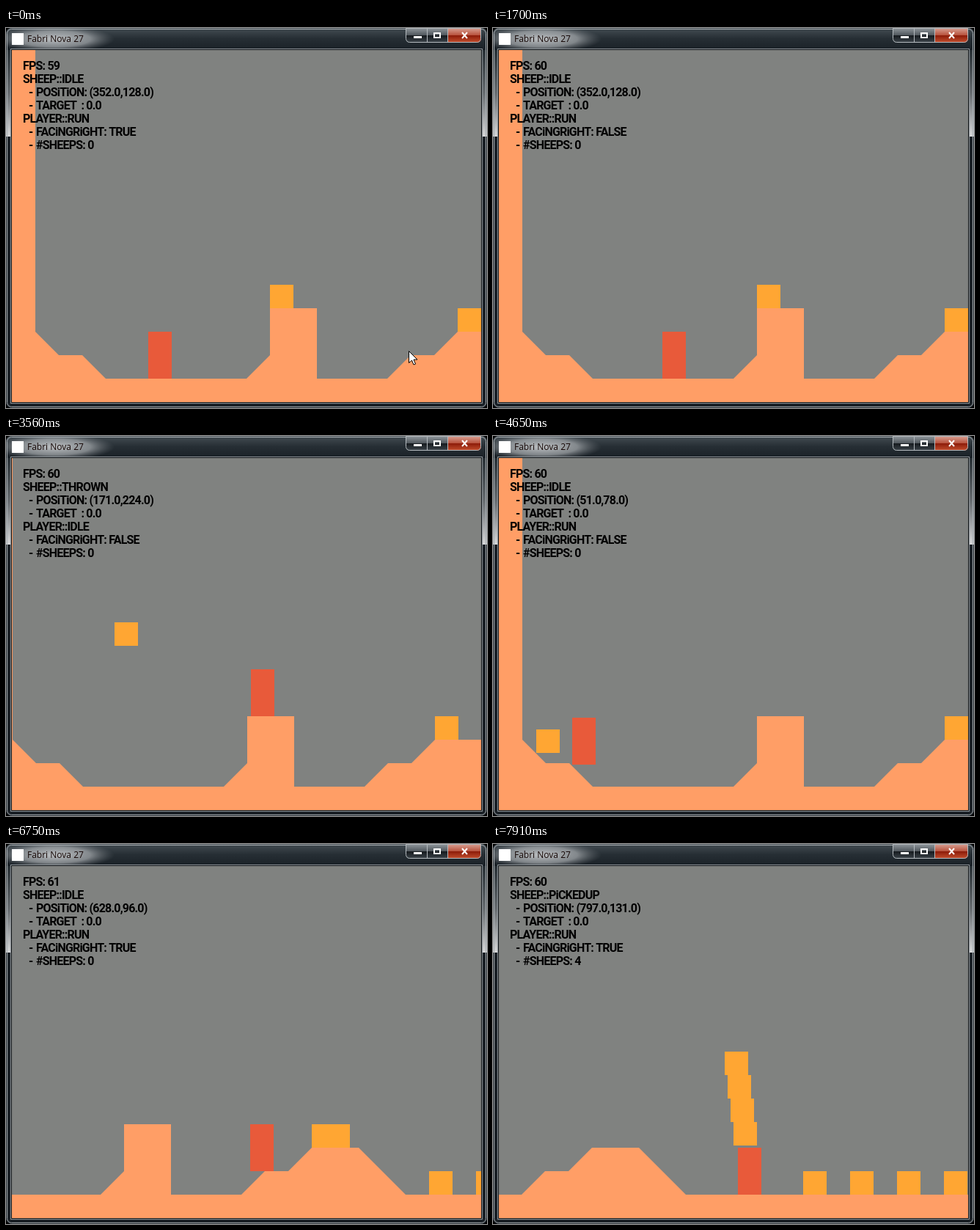
Animation, 656 px wide and 518 px high, one loop 7.99 s. Source, as an HTML page with a canvas:

```html
<!DOCTYPE html>
<html lang="en">
<head>
<meta charset="utf-8">
<title>Sheep platformer</title>
<style>
html, body { margin: 0; width: 100%; height: 100%; overflow: hidden; background: #000; }
canvas { display: block; width: 656px; height: 518px; }
</style>
</head>
<body>
<canvas id="stage" width="656" height="518"></canvas>
<script>
const ctx = document.getElementById('stage').getContext('2d');
const LOOP = 7990, TICKS = 103, TICK = LOOP / TICKS;
const LEFT = 8, TOP = 30, W = 640, H = 480, FLOOR = TOP + H, TILE = 32;
const SKY = '#808280', EARTH = '#ff9e66', WOOL = '#ffa633', HERO = '#e85a3a';

// Level, top row first; s marks a sheep
const LEVEL = [
  ...Array(10).fill('#'),
  '#          s',
  '#          ##      s',
  '#\\         ##     /##\\',
  '###\\      /##   /#####\\ ' + 's '.repeat(10),
  '#'.repeat(60)
];

// Physics, in pixels per tick
const SUB = 200, DT = 1 / SUB;
const RUN = 18.84, JUMP = 50.7, GRAVITY = 12.9, THROW_X = 38.34, THROW_Y = 38;

// Key presses, in ticks
const KEYS = {
  right: [0, 13.4, 22.4, 61.82],
  left: [8.75, 19, 36.2, 46.37],
  stop: [4, 33.1, 38],
  jump: [11.8, 26.2, 73],
  grab: [32.5, 62.5, 90, 92, 99, 102],
  toss: [41, 76.855]
};

function eachTile(visit) {
  LEVEL.forEach((row, i) => [...row].forEach((tile, col) => {
    if (tile !== ' ') visit(tile, col * TILE, (LEVEL.length - 1 - i) * TILE);
  }));
}

function heightAt(x) {
  const col = Math.floor(x / TILE), part = x - col * TILE;
  const i = LEVEL.findIndex(row => '#/\\'.includes(row[col] || ' '));
  const base = (LEVEL.length - 1 - i) * TILE, tile = LEVEL[i][col];
  return base + (tile === '/' ? part : tile === '\\' ? TILE - part : TILE);
}

const ground = x => Math.max(heightAt(x - 2), heightAt(x + 31.99));

// Moves a body through the air; true once it has landed
function fall(body) {
  body.y += body.vy * DT - GRAVITY * DT * DT / 2;
  body.vy -= GRAVITY * DT;
  const floor = ground(body.x);
  if (body.y > floor) return false;
  body.y = floor;
  return true;
}

function stepHero(hero) {
  const next = hero.x + hero.dir * RUN * DT;
  if (ground(next) - hero.y < 0.5) hero.x = next;
  if (hero.air) {
    hero.air = !fall(hero);
  } else if (ground(hero.x) > hero.y - 1) {
    hero.y = ground(hero.x);
  } else {
    hero.air = true;
    hero.vy = 0;
  }
}

function stepSheep(sheep) {
  if (sheep.state !== 'THROWN') return;
  sheep.x += sheep.vx * DT;
  if (fall(sheep)) sheep.state = 'IDLE';
}

const lean = (hero, slot) => (hero.right ? -1 : 1) * (6 + 4 * slot);

function snapshot(hero, sheep, stack) {
  const x = Math.floor(hero.x), y = Math.round(hero.y);
  return {
    x, y, right: hero.right, count: stack.length,
    cam: Math.max(0, Math.round(hero.x - 326)),
    state: hero.air ? 'JUMP' : hero.dir ? 'RUN' : 'IDLE',
    sheep: sheep.map(s => {
      const slot = stack.indexOf(s);
      return slot < 0
        ? { x: Math.floor(s.x), y: Math.round(s.y), state: s.state }
        : { x: x + lean(hero, slot), y: y + 67 + TILE * slot, state: s.state };
    })
  };
}

function simulate() {
  const hero = { x: 186.5, y: TILE, vy: 0, dir: 1, right: true, air: false };
  const sheep = [], stack = [], shots = [];
  eachTile((tile, x, y) => { if (tile === 's') sheep.push({ x, y, state: 'IDLE' }); });

  const face = right => { hero.right = right; hero.dir = right ? 1 : -1; };
  const act = {
    right: () => face(true),
    left: () => face(false),
    stop: () => { hero.dir = 0; },
    jump: () => { hero.air = true; hero.vy = JUMP; },
    grab: () => {
      const near = sheep.find(s => s.state === 'IDLE' && Math.abs(s.x - hero.x) < TILE);
      if (!near) return;
      near.state = 'PiCKEDUP';
      stack.push(near);
    },
    toss: () => {
      const s = stack.pop();
      if (!s) return;
      Object.assign(s, {
        x: hero.x + lean(hero, 0), y: hero.y + 67,
        vx: hero.right ? THROW_X : -THROW_X, vy: THROW_Y, state: 'THROWN'
      });
    }
  };
  const queue = {};
  Object.entries(KEYS).forEach(([key, times]) => times.forEach(t => { queue[Math.round(t * SUB)] = act[key]; }));

  for (let i = 0; i < TICKS * SUB; i++) {
    if (queue[i]) queue[i]();
    if (i % SUB === 0) shots.push(snapshot(hero, sheep, stack));
    stepHero(hero);
    sheep.forEach(stepSheep);
  }
  return shots;
}

function box(color, x, y, w, h) {
  ctx.fillStyle = color;
  ctx.fillRect(x, y, w, h);
}

function frame(color, x, y, w, h) {
  ctx.strokeStyle = color;
  ctx.lineWidth = 1;
  ctx.strokeRect(x + 0.5, y + 0.5, w - 1, h - 1);
}

function blend(x0, y0, x1, y1, stops) {
  const g = ctx.createLinearGradient(x0, y0, x1, y1);
  stops.forEach(([at, color]) => g.addColorStop(at, color));
  return g;
}

function drawTile(tile, x, y) {
  if (tile === 's') return;
  if (tile === '#') return box(EARTH, x, y, TILE, TILE);
  ctx.fillStyle = EARTH;
  ctx.beginPath();
  ctx.moveTo(x, y + TILE);
  ctx.lineTo(tile === '/' ? x + TILE : x, y);
  ctx.lineTo(x + TILE, y + TILE);
  ctx.fill();
}

function drawWorld(shot) {
  ctx.save();
  ctx.beginPath();
  ctx.rect(LEFT, TOP, W, H);
  ctx.clip();
  box(SKY, LEFT, TOP, W, H);
  ctx.translate(LEFT - shot.cam, FLOOR);
  eachTile((tile, x, y) => drawTile(tile, x, -y - TILE));
  box(HERO, shot.x, -shot.y - 2 * TILE, TILE, 2 * TILE);
  shot.sheep.forEach(s => box(WOOL, s.x, -s.y - TILE, TILE, TILE));
  ctx.restore();
}

function drawDebug(k, shot) {
  const first = shot.sheep[0];
  const fps = k < 10 ? 59 : k >= 85 && k < 98 ? 61 : 60;
  ctx.font = 'bold 16px Roboto, "Liberation Sans", sans-serif';
  ctx.letterSpacing = '-0.8px';
  ctx.fillStyle = '#000';
  const lines = [
    `FPS: ${fps}`,
    `SHEEP::${first.state}`,
    `- POSiTiON: (${first.x}.0,${first.y}.0)`,
    '- TARGET  : 0.0',
    `PLAYER::${shot.state}`,
    `- FACiNGRiGHT: ${shot.right ? 'TRUE' : 'FALSE'}`,
    `- #SHEEPS: ${shot.count}`
  ];
  lines.forEach((line, i) => {
    const y = 57 + 18 * i;
    if (line[0] === '-') {
      ctx.fillText('-', 31, y);
      ctx.fillText(line.slice(2), 41, y);
    } else {
      ctx.fillText(line, 23, y);
    }
  });
  ctx.letterSpacing = '0px';
}

function drawButtons() {
  const dark = blend(0, 1, 0, 20, [[0, '#8a9196'], [0.45, '#52595f'], [0.5, '#171c20'], [1, '#3d454b']]);
  const red = blend(0, 1, 0, 20, [[0, '#d79a8c'], [0.45, '#b9543f'], [0.5, '#8e1d0a'], [1, '#c4502f']]);
  ctx.save();
  ctx.beginPath();
  ctx.roundRect(545, 0, 103, 20, [0, 0, 5, 5]);
  ctx.clip();
  box(dark, 545, 0, 57, 20);
  box(red, 602, 0, 46, 20);
  ctx.restore();
  ctx.strokeStyle = '#b3b9bd';
  ctx.lineWidth = 1;
  ctx.beginPath();
  ctx.roundRect(545.5, 0.5, 102, 19, [0, 0, 5, 5]);
  [574.5, 602.5].forEach(x => { ctx.moveTo(x, 1); ctx.lineTo(x, 19); });
  ctx.stroke();
  box('#fff', 556, 11, 11, 3);
  ctx.strokeStyle = '#fff';
  ctx.lineWidth = 2;
  ctx.strokeRect(584, 7, 8, 6);
  ctx.beginPath();
  ctx.moveTo(622, 6); ctx.lineTo(629, 14);
  ctx.moveTo(629, 6); ctx.lineTo(622, 14);
  ctx.stroke();
}

function drawWindow() {
  box('#000', 0, 0, 656, 518);
  ctx.save();
  ctx.beginPath();
  ctx.roundRect(0, 0, 656, 518, 7);
  ctx.clip();
  box('#1b2127', 0, 0, 656, 518);
  box(blend(0, 0, 0, 29, [[0, '#444d53'], [0.5, '#262e34'], [1, '#1b2228']]), 0, 0, 656, 30);
  const side = blend(0, 30, 0, 148, [[0, '#2a3237'], [0.5, '#6a6f73'], [1, '#d6d7d8']]);
  [0, 648].forEach(x => box(side, x, 30, 8, 118));
  const glow = ctx.createRadialGradient(0, 0, 0, 0, 0, 1);
  glow.addColorStop(0, 'rgba(205,208,210,.9)');
  glow.addColorStop(0.6, 'rgba(180,184,187,.65)');
  glow.addColorStop(1, 'rgba(120,125,130,0)');
  ctx.translate(66, 15);
  ctx.scale(82, 18);
  box(glow, -1, -1, 2, 2);
  ctx.restore();
  ctx.strokeStyle = '#a9afb3';
  ctx.lineWidth = 1;
  ctx.beginPath();
  ctx.roundRect(1.5, 1.5, 653, 515, 6);
  ctx.stroke();
  frame('#8e9499', 6, 28, 644, 484);
  frame('#101417', 7, 29, 642, 482);
  box('#fff', 8, 7, 16, 16);
  ctx.font = '12px "Open Sans", "Noto Sans", sans-serif';
  ctx.fillStyle = '#160806';
  ctx.fillText('Fabri Nova 27', 29, 19);
  drawButtons();
}

function drawCursor(k) {
  if (k > 2) return;
  ctx.save();
  ctx.translate(549.5 + 32 * k, 440.5 - 6 * k);
  ctx.beginPath();
  [[0, 0], [0, 16], [4, 12.5], [6.5, 18.5], [9, 17.5], [6.5, 11.5], [11.5, 11.5]]
    .forEach(([x, y]) => ctx.lineTo(x, y));
  ctx.closePath();
  ctx.fillStyle = '#fff';
  ctx.fill();
  ctx.strokeStyle = '#000';
  ctx.lineWidth = 1;
  ctx.stroke();
  ctx.restore();
}

const shots = simulate();

function render(ms) {
  const k = Math.min(TICKS - 1, Math.floor((ms % LOOP + 21) / TICK));
  drawWindow();
  drawWorld(shots[k]);
  drawDebug(k, shots[k]);
  drawCursor(k);
}

const start = performance.now();
function loop() {
  render(performance.now() - start);
  requestAnimationFrame(loop);
}
loop();
</script>
</body>
</html>
```
